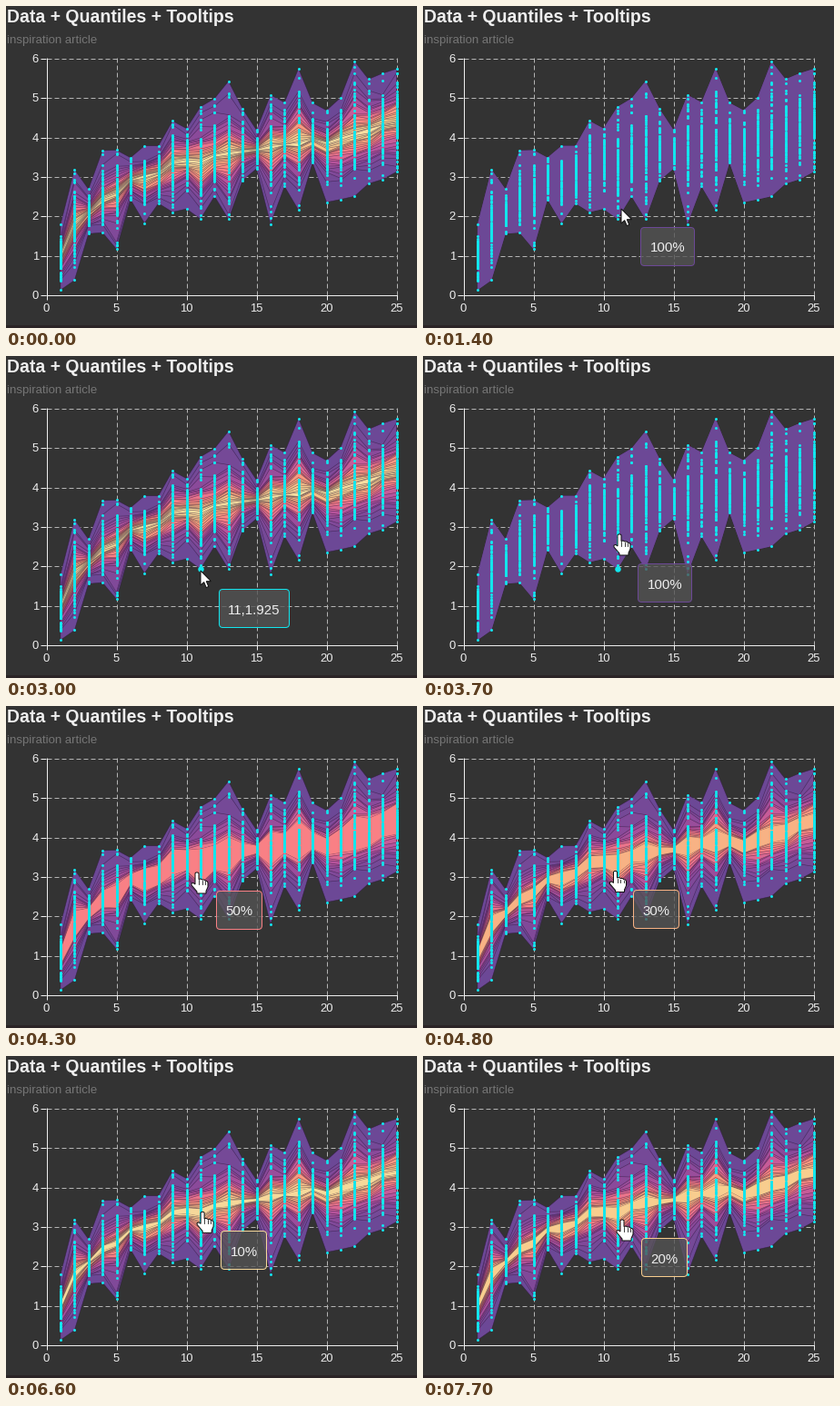
These frames come from a looping animation (452 by 354 pixels, 8000 ms). A matplotlib script:

```python
import numpy as np
import matplotlib.pyplot as plt
from matplotlib.animation import FuncAnimation
from matplotlib.colors import LinearSegmentedColormap
from matplotlib.patches import FancyBboxPatch, Polygon, Rectangle

W, H, DPI = 452, 354, 64  # a power of two keeps the pixel size exact
PT = 72 / DPI
STEP, FRAMES = 100, 80
BG, INK, CYAN = "#333333", "#eeeeee", "#12e6ee"

plt.rcParams["font.family"] = "Liberation Sans"
fig = plt.figure(figsize=(W / DPI, H / DPI), dpi=DPI, facecolor=BG)
ax = fig.add_axes([0, 0, 1, 1])
ax.set(xlim=(0, W), ylim=(H, 0))
ax.axis("off")


def px(x):
    return 44.5 + 15.4 * np.asarray(x)


def py(y):
    return 317.5 - 43.33 * np.asarray(y)


def label(x, y, s, size, color=INK, **kw):
    return ax.text(x, y, s, fontsize=size * PT, color=color, **kw)


def line(xs, ys, color=INK, z=1, **kw):
    ax.plot(xs, ys, color=color, lw=PT, zorder=z, solid_capstyle="butt", **kw)


# Frame of the chart
ax.add_patch(Rectangle((0, 351), W, 3, color="#2b2426", lw=0))
label(1, 18, "Data + Quantiles + Tooltips", 19.5, weight="bold")
label(1, 41, "inspiration article", 13.2, "#757575")
dash = dict(color="#b4b4b4", dashes=(5, 3))
for v in range(7):
    y = np.floor(py(v)) + 0.5
    line([38, 44], [y, y])
    label(36, y, str(v), 13, ha="right", va="center_baseline")
    if v:
        line([45, 430], [y, y], **dash)
for v in range(0, 26, 5):
    x = np.floor(px(v)) + 0.5
    line([x, x], [317, 323])
    label(x, 336, str(v), 13, ha="center")
    if v:
        line([x, x], [57, 317], **dash)
line([44.5, 44.5], [57, 318])
line([44, 430], [317.5, 317.5])

# Samples: a normal cloud around each median, stretched to the extremes
top = [1.78, 3.18, 2.68, 3.66, 3.67, 3.48, 3.78, 3.78, 4.41, 4.22, 4.77, 4.98, 5.42,
       4.72, 4.18, 5.07, 4.88, 5.74, 4.87, 4.68, 5.00, 5.92, 5.47, 5.62, 5.73]
low = [0.12, 0.37, 1.55, 1.58, 1.16, 2.42, 1.82, 2.32, 2.10, 2.18, 1.925, 2.50, 1.92,
       2.90, 3.20, 1.80, 2.75, 2.15, 3.35, 2.35, 2.42, 2.50, 2.82, 2.93, 3.12]
mid = [0.95, 1.75, 2.10, 2.45, 2.60, 2.90, 3.00, 3.10, 3.35, 3.42, 3.35, 3.50, 3.60,
       3.62, 3.68, 3.75, 3.80, 3.85, 3.95, 3.85, 3.95, 4.05, 4.15, 4.30, 4.35]
rng = np.random.default_rng(11)
days = np.arange(1, 26)
cols = []
for t, b, m in zip(top, low, mid):
    z = rng.normal(size=78)
    z = np.clip(z - np.median(z), -2.5, 2.5) / 2.7
    y = np.where(z > 0, m + z * (t - m), m + z * (m - b))
    cols.append(np.concatenate([y, [t, b]]))
cols[10][np.argmin(abs(cols[10] - 3.172))] = 3.172
data = np.array(cols)

sunset = LinearSegmentedColormap.from_list("sunset", [
    (0, "#f5e2a6"), (0.2, "#f8cd8e"), (0.35, "#f8a47e"), (0.5, "#fa8085"),
    (0.68, "#bd559c"), (0.85, "#8a4a9a"), (1, "#6c4896")])


def band(share):
    hi = np.quantile(data, 0.5 + share / 2, axis=1)
    lo = np.quantile(data, 0.5 - share / 2, axis=1)
    xs = px(days)
    return np.column_stack([np.r_[xs, xs[::-1]], np.r_[py(hi), py(lo)[::-1]]])


for i in range(20, 0, -1):
    shape = band(i / 20)
    ax.add_patch(Polygon(shape, fc=sunset(i / 20), lw=0, zorder=3))
    ax.add_patch(Polygon(shape, fill=False, ec=(0.17, 0.08, 0.22, 0.6),
                         lw=0.6 * PT, zorder=3))

lit = ax.add_patch(Polygon(band(1), lw=0, zorder=4))
ax.plot(np.repeat(px(days), data.shape[1]), py(data.ravel()), "o", color=CYAN,
        ms=3 * PT, mew=0, zorder=5)
big, = ax.plot([], [], "o", color=CYAN, ms=6.5 * PT, mew=0, zorder=6)

# Tooltip and mouse pointers
tip = ax.add_patch(FancyBboxPatch(
    (0, 0), 1, 1, boxstyle="round,pad=0,rounding_size=4",
    fc=(0.33, 0.33, 0.33, 0.78), lw=PT, zorder=7))
tip_text = label(0, 0, "", 15, ha="center", va="center_baseline", zorder=8)

ARROW = np.array([(0, 0), (0, 16), (3.7, 12.6), (6.2, 18.6), (8.8, 17.5),
                  (6.3, 11.7), (11.5, 11.7)])
HAND = np.array([(-2, 1), (-1, 0), (1, 0), (2, 1), (2, 7.5), (4, 7), (6, 8),
                 (8, 8), (9.5, 9.3), (11, 9.5), (12, 11), (12, 16), (10, 20.5),
                 (10, 23), (0, 23), (0, 21), (-6, 14), (-6, 12), (-4, 11.5), (-2, 13)])
pointer = ax.add_patch(Polygon(ARROW, fc="white", ec="#111111", lw=PT, zorder=9))
knuckles = [ax.plot([], [], color="#111111", lw=0.8 * PT, zorder=10)[0] for _ in range(3)]

# Pointer path: time, x, y
PATH = np.array([
    (500, 246, 288), (1100, 218, 223), (1600, 218, 223), (2100, 214, 236),
    (3100, 214, 236), (3700, 216, 196), (4000, 210, 183), (4500, 210, 183),
    (5100, 213, 180), (6000, 213, 180), (6500, 216, 171), (7300, 219, 180)])

# Hovered item: start, band share or point value
HOVER = [(0, None), (900, 1.0), (1900, "1.925"), (3200, 1.0), (3800, 0.9),
         (3900, 0.7), (4000, 0.5), (4600, 0.4), (4800, 0.3), (5000, "3.172"),
         (6100, 0.3), (6300, 0.1), (6900, 0.2)]


def cursor(t):
    t = np.clip(t, PATH[0, 0], PATH[-1, 0])
    k = min(np.searchsorted(PATH[:, 0], t, side="right") - 1, len(PATH) - 2)
    a, b = PATH[k], PATH[k + 1]
    u = (t - a[0]) / (b[0] - a[0])
    return a[1:] + (b[1:] - a[1:]) * u * u * (3 - 2 * u)


def show_tip(t, item):
    point = isinstance(item, str)
    text = "11," + item if point else f"{item * 100:.0f}%"
    w = 77 if point else 59 if item == 1 else 50
    # The box trails the pointer
    x, y = np.mean([cursor(t - d) for d in range(0, 401, 50)], axis=0) + (20.5, 19.5)
    x, y = round(x) + 0.5, round(y) + 0.5
    tip.set_bounds(x, y, w, 42)
    tip.set_edgecolor(CYAN if point else sunset(item))
    tip_text.set_text(text)
    tip_text.set_position((x + w / 2, y + 21.5))
    alpha = min(1, (t - 800) / 400)
    tip.set_alpha(None if alpha == 1 else 0.78 * alpha)
    tip_text.set_alpha(alpha)


def draw(i):
    t = i * STEP
    item = [v for start, v in HOVER if start <= t][-1]
    share = item if isinstance(item, float) else None

    lit.set_visible(share is not None)
    if share is not None:
        lit.set_xy(band(share))
        lit.set_facecolor(sunset(share))

    spot = 1.925 if 1900 <= t < 3900 else 3.172 if 5000 <= t < 6100 else None
    big.set_data(*(([], []) if spot is None else ([px(11)], [py(spot)])))

    for part in (tip, tip_text):
        part.set_visible(item is not None)
    if item is not None:
        show_tip(t, item)

    hand = t >= 3200
    pos = cursor(t)
    pointer.set_visible(t >= 500)
    pointer.set_xy((HAND if hand else ARROW) + pos)
    for n, k in enumerate(knuckles):
        k.set_visible(hand)
        k.set_data([pos[0] + 2 + 3.5 * n] * 2, [pos[1] + 8 + n, pos[1] + 12.5])
    return []


anim = FuncAnimation(fig, draw, frames=FRAMES, interval=STEP, repeat=True,
                     repeat_delay=0, init_func=lambda: draw(0))
plt.show()
```
